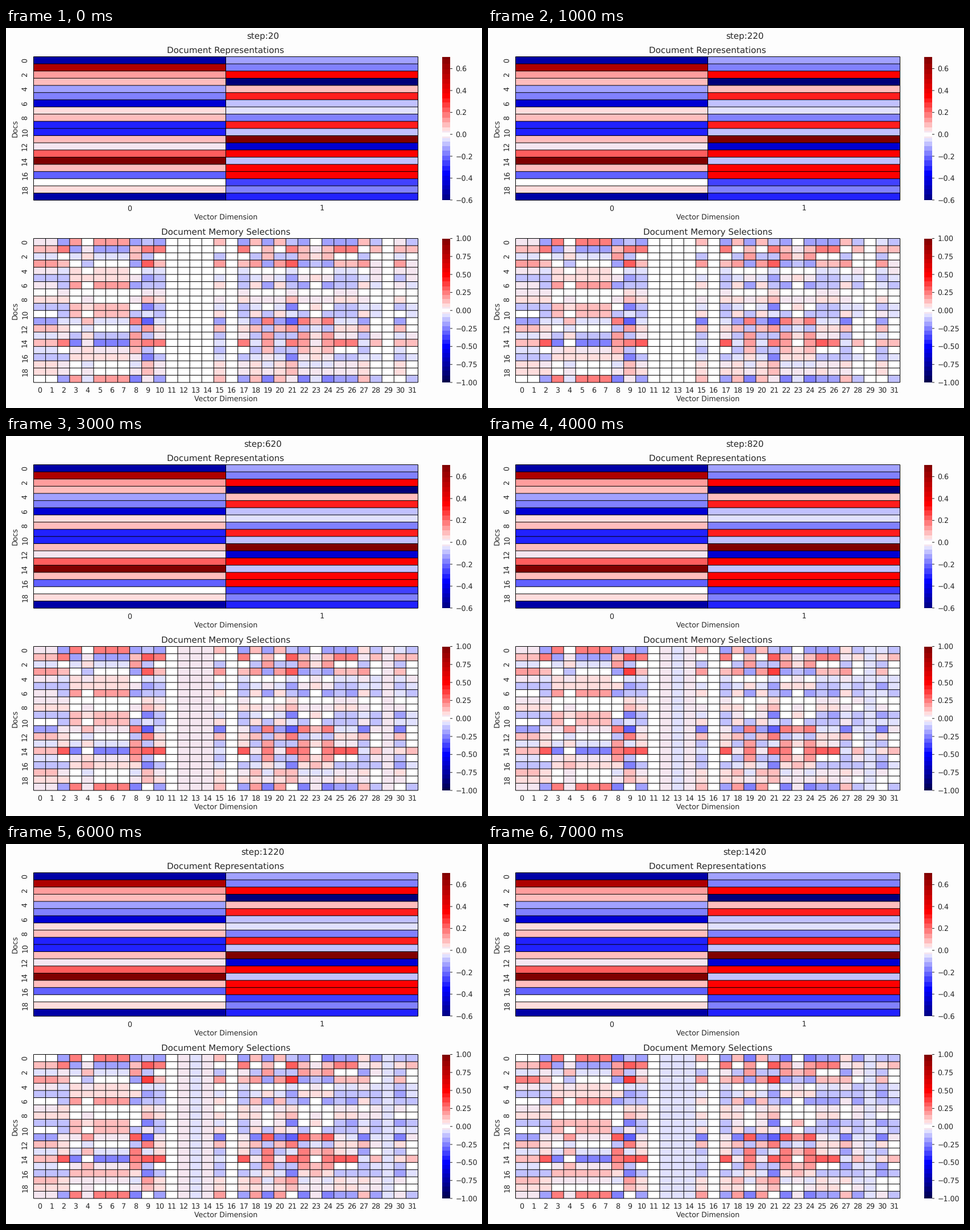
Write a matplotlib script that moves like this. It is 837x669 px and loops after 8 s.

```python
import numpy as np
import matplotlib.pyplot as plt
from matplotlib.animation import FuncAnimation
from matplotlib.colors import ListedColormap

W, H, DPI = 837, 669, 64
PT = 72 / DPI  # points per pixel
INK = "#262626"
LEFT, RIGHT = 48.5, 724.5
STEPS, SLOTS = 8, 32

plt.rcParams["font.family"] = "DejaVu Sans"
plt.rcParams["text.hinting"] = "none"

# Coordinates of the documents, in hundredths
docs = np.array([
    [-55, 57, 14, 8, -14, -19, -44, 6, 8, -30,
     -31, 8, 3, 22, 71, 9, -22, 0, 6, -54],
    [-13, -17, 36, -60, 9, 30, -8, -6, -19, 30,
     -9, 70, -42, 36, -8, 36, 37, -28, -19, -31],
]).T / 100

# Memory slots that respond to the same direction: strength, degrees, slots
GROUPS = [
    (0.39, -18, (2, 10, 17, 25, 26)),
    (0.20, -10, (28, 31)),
    (0.38, 185, (3, 5, 6, 7)),
    (0.44, 45, (8, 19, 22, 24)),
    (0.20, 95, (4, 23)),
    (0.57, -55, (9, 21)),
    (0.31, -65, (0, 1, 30)),
    (0.31, -110, (15, 18, 20, 27)),
]


def slot_weights():
    weights = np.zeros((2, SLOTS))
    for strength, degrees, slots in GROUPS:
        angle = np.radians(degrees)
        direction = strength * np.array([np.cos(angle), np.sin(angle)])
        weights[:, list(slots)] = direction[:, None]
    return weights


def bump(center, width):
    return np.exp(-((np.arange(SLOTS) - center) / width) ** 2)


# Training strengthens every weight and pulls two bands of slots below zero
base = docs @ slot_weights()
bias = 0.02 - 0.11 * bump(13, 1.6) - 0.10 * bump(29, 2.4)


def selections(k):
    t = (k / (STEPS - 1)) ** 0.8
    return base * (1 + 0.12 * t) + bias * t


def stepped_seismic():
    u = np.linspace(-1, 1, 513)
    colors = plt.get_cmap("seismic")((np.round(u * 16) / 16 + 1) / 2)
    colors[np.abs(u) < 0.05] = (0.96, 0.90, 0.94, 1)
    colors[np.abs(u) < 0.025] = (1, 1, 1, 1)
    return ListedColormap(colors)


cmap = stepped_seismic()
fig = plt.figure(figsize=(W / DPI, H / DPI), dpi=DPI, facecolor="#fdfdfd")
ax = fig.add_axes([0, 0, 1, 1])
ax.set_axis_off()


def label(x, y, text, px=12.58, ha="center", rotation=0):
    return ax.text(x, y, text, fontsize=px * PT, color=INK, ha=ha,
                   va="baseline", rotation=rotation, rotation_mode="anchor")


def heatmap(data, top, bottom, limit, title):
    rows, cols = data.shape
    xs = np.linspace(LEFT, RIGHT, cols + 1)
    ys = np.linspace(top, bottom, rows + 1)
    mesh = ax.pcolormesh(xs, ys, data, cmap=cmap, vmin=-limit, vmax=limit)
    style = dict(colors="black", linewidth=PT, snap=False)
    ax.hlines(ys, LEFT, RIGHT, **style)
    ax.vlines(xs, top, bottom, **style)

    mid = (LEFT + RIGHT) / 2
    label(mid, top - 7, title, 15.1)
    label(mid, bottom + 34.3, "Vector Dimension")
    label(19.5, (top + bottom) / 2, "Docs", rotation=90)
    for c in range(cols):
        label((xs[c] + xs[c + 1]) / 2, bottom + 18.2, str(c))
    for r in range(0, rows, 2):
        label(37, (ys[r] + ys[r + 1]) / 2, str(r), rotation=90)
    return mesh


def colorbar(top, bottom, low, high, ticks, digits):
    limit = max(-low, high)
    ys = np.linspace(top, bottom, 257)
    values = np.linspace(high, low, 256)[:, None]
    ax.pcolormesh([767, 781], ys, values, cmap=cmap, vmin=-limit, vmax=limit)
    for v in ticks:
        y = top + (high - v) / (high - low) * (bottom - top)
        ax.hlines(y, 781, 785, colors=INK, linewidth=PT, snap=False)
        sign = "\u2212" if v < 0 else ""
        label(790.5, y + 4.6, f"{sign}{abs(v):.{digits}f}", ha="left")


heatmap(docs, 50.5, 303.2, 0.71, "Document Representations")
memory = heatmap(base, 370.5, 624, 1, "Document Memory Selections")
colorbar(50.5, 303.2, -0.602, 0.709, np.arange(-3, 4) / 5, 1)
colorbar(370.5, 624, -1, 1, np.arange(-4, 5) / 4, 2)
counter = label(451.5, 19, "", 15.1)

ax.set_xlim(0, W)
ax.set_ylim(H, 0)


def update(k):
    memory.set_array(selections(k))
    counter.set_text(f"step:{20 + 200 * k}")
    return memory, counter


anim = FuncAnimation(fig, update, frames=STEPS, interval=1000, repeat=True,
                     repeat_delay=0)
plt.show()
```
